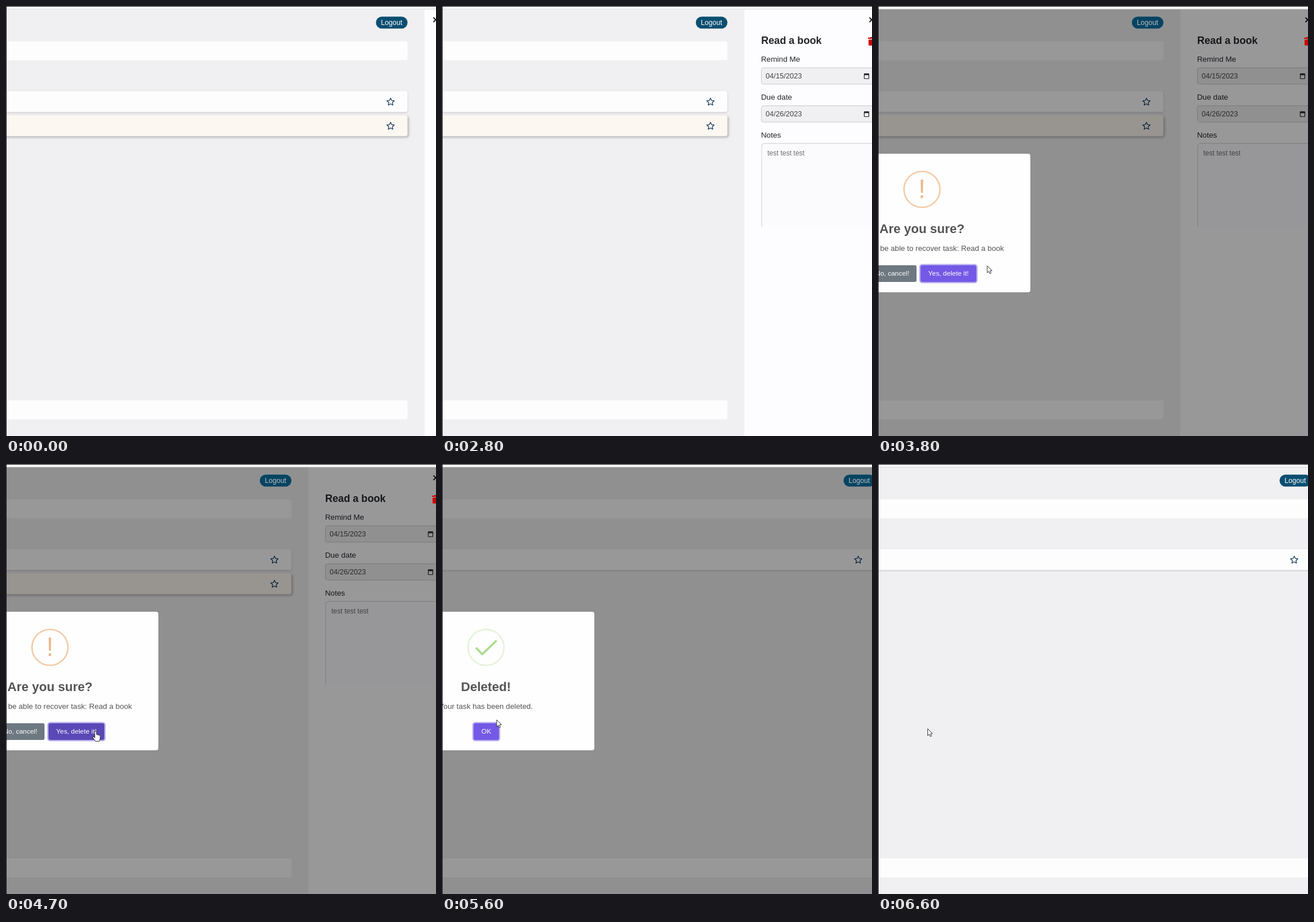
An HTML page with a canvas that plays this animation: 748x748 px, repeating every 6800 ms.

```html
<!DOCTYPE html>
<html lang="en">
<head>
<meta charset="utf-8">
<title>Delete a task</title>
<style>
html, body { margin: 0; height: 100%; overflow: hidden; background: #f0eff1; }
canvas { display: block; }
</style>
</head>
<body>
<canvas id="stage" width="748" height="748"></canvas>
<script>
const c = document.getElementById('stage').getContext('2d');
const FONT = '"Liberation Sans", Arial, sans-serif';
const LOOP = 6800, STEP = 100;
const ASK = 2870, DONE = 4870, CLOSE = 6300;

// Piecewise linear track of [time, ...values]
function track(t, keys) {
  const i = keys.findIndex(k => k[0] > t);
  if (i < 0) return keys[keys.length - 1].slice(1);
  if (i === 0) return keys[0].slice(1);
  const a = keys[i - 1], b = keys[i], u = (t - a[0]) / (b[0] - a[0]);
  return a.slice(1).map((v, k) => v + (b[k + 1] - v) * u);
}

const popScale = age => track(age, [[0, .7], [125, 1.037], [135, 1.05], [240, .95], [300, 1]])[0];

function panelX(t) {
  if (t < 300) return 526 + 202 * (1 - t / 300) ** 2.5;
  if (t < 4800) return 526;
  const u = Math.min(1, (t - 4800) / 400);
  return 526 + 257 * u * u * (3 - 2 * u);
}

function box(x, y, w, h, r, fill, stroke, line = 1) {
  c.beginPath();
  c.roundRect(x, y, w, h, r);
  if (fill) { c.fillStyle = fill; c.fill(); }
  if (stroke) { c.strokeStyle = stroke; c.lineWidth = line; c.stroke(); }
}

function text(s, x, y, size, color, align = 'left', weight = 400) {
  c.font = `${weight} ${size}px ${FONT}`;
  c.textAlign = align;
  c.fillStyle = color;
  c.fillText(s, x, y);
}

function poly(points, stroke, width, fill, closed) {
  c.beginPath();
  points.forEach(p => c.lineTo(...p));
  if (closed) c.closePath();
  if (fill) { c.fillStyle = fill; c.fill(); }
  c.strokeStyle = stroke;
  c.lineWidth = width;
  c.lineJoin = 'round';
  c.stroke();
}

function shadowed(color, blur, dx, dy, draw) {
  c.save();
  c.shadowColor = color;
  c.shadowBlur = blur;
  c.shadowOffsetX = dx;
  c.shadowOffsetY = dy;
  draw();
  c.restore();
}

function star(x, y) {
  const points = [];
  for (let i = 0; i < 10; i++) {
    const a = i * Math.PI / 5, r = i % 2 ? 3.3 : 6.7;
    points.push([x + r * Math.sin(a), y + .5 - r * Math.cos(a)]);
  }
  poly(points, '#173f63', 1.3, null, true);
}

function mainArea(right, hasTask) {
  const bar = (y, h, fill) => box(-20, y, right + 20, h, 4, fill);
  bar(61.5, 33, '#fdfdfe');
  bar(686, 33, '#fdfdfe');
  shadowed('rgba(0,0,0,.2)', 3, 0, 1, () => bar(148, 36.5, '#fefdfe'));
  star(right - 29.5, 166.5);
  if (!hasTask) return;
  shadowed('rgba(0,0,0,.28)', 4, 2, 2, () => bar(190, 36.5, '#fdf7f1'));
  star(right - 29.5, 208.5);
}

function dateField(x, y, label, value) {
  text(label, x, y - 10, 13.3, '#212529');
  box(x + .5, y + .5, 260, 28.5, 4, '#f0eff1', '#cbcbce');
  text(value, x + 8, y + 18.5, 12.6, '#444');
  if (x > 600) return;
  box(734.5, y + 11, 8, 8.5, 1, null, '#222', 1.2);
  c.fillStyle = '#222';
  c.fillRect(734, y + 10.5, 9, 2.8);
}

function panel(px) {
  c.fillStyle = '#fdfcfe';
  c.fillRect(px, 6, 748, 742);
  const x = px + 29;
  text('Read a book', x + .2, 66, 17.7, '#212529', 'left', 700);
  dateField(x, 107, 'Remind Me', '04/15/2023');
  dateField(x, 173, 'Due date', '04/26/2023');
  text('Notes', x, 229, 13.3, '#212529');
  box(x + 1, 239, 260, 146, 5, '#fbfafc');
  c.beginPath();
  c.moveTo(x + 1, 384);
  c.arcTo(x + 1, 239, x + 8, 239, 5);
  c.lineTo(760, 239);
  c.strokeStyle = '#dcdcdf';
  c.lineWidth = 1.4;
  c.stroke();
  text('test test test', x + 11, 260, 12, '#6d6d70');
}

function closeMark() {
  poly([[743.5, 20], [751.5, 28]], '#111', 1.8);
  poly([[743.5, 28], [751.5, 20]], '#111', 1.8);
}

function trash() {
  c.fillStyle = '#cc0505';
  c.fillRect(741, 55, 12, 2);
  c.fillRect(745, 54, 5, 2);
  box(742, 58.3, 10, 10.5, 1.5, '#cc0505');
}

function logout(right, dim) {
  box(right - 55, 18.5, 55, 20.7, 10.4, dim ? '#064462' : '#0b4f71');
  text('Logout', right - 27.7, 33, 12.1, dim ? '#bdbec2' : '#fff', 'center');
}

function button(label, x, w, fill, ring) {
  if (ring) box(x - 1, 450, w + 2, 31, 4, null, '#b7afef', 2.6);
  box(x, 451, w, 29, 3, fill);
  text(label, x + w / 2, 469.2, 11.8, '#fff', 'center');
}

function ringIcon(color) {
  c.beginPath();
  c.arc(76.5, 319, 31.3, 0, 7);
  c.strokeStyle = color;
  c.lineWidth = 2.6;
  c.stroke();
}

function dialog(scale, title, message, body) {
  c.save();
  c.translate(76.5, 377.5);
  c.scale(scale, scale);
  c.translate(-76.5, -377.5);
  box(-112, 257, 377, 241, 4, '#fefefe');
  text(title, 76.5, 395.3, 22, '#545454', 'center', 700);
  text(message, 76.5, 426, 13.2, '#545454', 'center');
  body();
  c.restore();
}

function askDialog(t) {
  dialog(popScale(t - ASK), 'Are you sure?', 'You will not be able to recover task: Read a book', () => {
    ringIcon('#f3cba6');
    text('!', 76.5, 334, 46, '#eab98c', 'center');
    button('No, cancel!', -17, 84, '#6e7881');
    button('Yes, delete it!', 74, 97, t >= 3900 ? '#5a48b6' : '#7459e6', true);
  });
}

function doneDialog(t) {
  const age = t - DONE;
  dialog(popScale(age), 'Deleted!', 'Your task has been deleted.', () => {
    ringIcon('#e4f3da');
    const u = Math.min(1, Math.max(0, (age - 100) / 350));
    const tip = track(u, [[0, 59, 319.5], [.35, 70, 331], [1, 95, 307]]);
    const points = [[59, 319.5]];
    if (u > .35) points.push([70, 331]);
    if (u > 0) poly([...points, tip], '#a9dc8c', 3.6);
    button('OK', 55, 44, t >= 5800 && t < CLOSE ? '#5a48b6' : '#7459e6', true);
  });
}

const SHAPES = {
  arrow: [[0, 0], [0, 12], [2.8, 9.6], [4.7, 13.6], [6.7, 12.7], [4.9, 8.8], [8.4, 8.4]],
  hand: [[0, 0], [1.5, -1], [3, 0], [3, 5], [8, 6.3], [9.5, 8], [9, 13], [7.5, 17], [1.5, 17],
    [-3.5, 10.5], [-3, 9], [-1.5, 9], [0, 11]]
};

// Each run: cursor shape and its path
const RUNS = [
  ['arrow', [[700, 10, 160], [800, 150, 90], [900, 340, 35], [1000, 546, 9], [1100, 750, 9]]],
  ['arrow', [[3400, 735, 80], [3500, 600, 190], [3600, 440, 300], [3700, 290, 400], [3800, 190, 452], [3900, 155, 465]]],
  ['hand', [[3900, 154.5, 465.5], [5300, 154.5, 465.5]]],
  ['arrow', [[5300, 150, 463], [5600, 95, 445], [5800, 87, 460]]],
  ['hand', [[5800, 86, 460], [CLOSE, 86, 460]]],
  ['arrow', [[CLOSE, 86.5, 460.5], [LOOP, 86.5, 460.5]]]
];

function cursor(t) {
  const run = RUNS.find(([, k]) => t >= k[0][0] && t < k[k.length - 1][0]);
  if (!run) return;
  const [x, y] = track(t, run[1]);
  poly(SHAPES[run[0]].map(([a, b]) => [x + a, y + b]), '#333', 1, '#fff', true);
}

function draw(t) {
  const px = panelX(t), right = px - 29.5;
  const dim = t >= ASK && t < CLOSE;
  c.fillStyle = '#f0eff1';
  c.fillRect(0, 0, 748, 748);
  mainArea(right, t < DONE);
  panel(px);
  if (px < 740) closeMark();
  if (dim) {
    c.fillStyle = `rgba(0,0,0,${.4 * Math.min(1, (t - ASK) / 100)})`;
    c.fillRect(0, 0, 748, 748);
  }
  logout(right, dim);
  if (px < 715) trash();

  // Window edges
  c.fillStyle = '#faf9fb';
  c.fillRect(0, 0, 748, 6);
  c.fillStyle = dim ? '#c4c3c6' : '#dddce0';
  c.fillRect(0, 5, 748, 1);

  if (dim) (t < DONE ? askDialog : doneDialog)(t);
  c.fillStyle = '#111';
  c.fillRect(0, 0, 748, 1);
  c.fillRect(0, 0, 1, 748);
  cursor(t);
}

function frame(now) {
  draw(Math.floor(now % LOOP / STEP) * STEP);
  requestAnimationFrame(frame);
}
requestAnimationFrame(frame);
</script>
</body>
</html>
```
